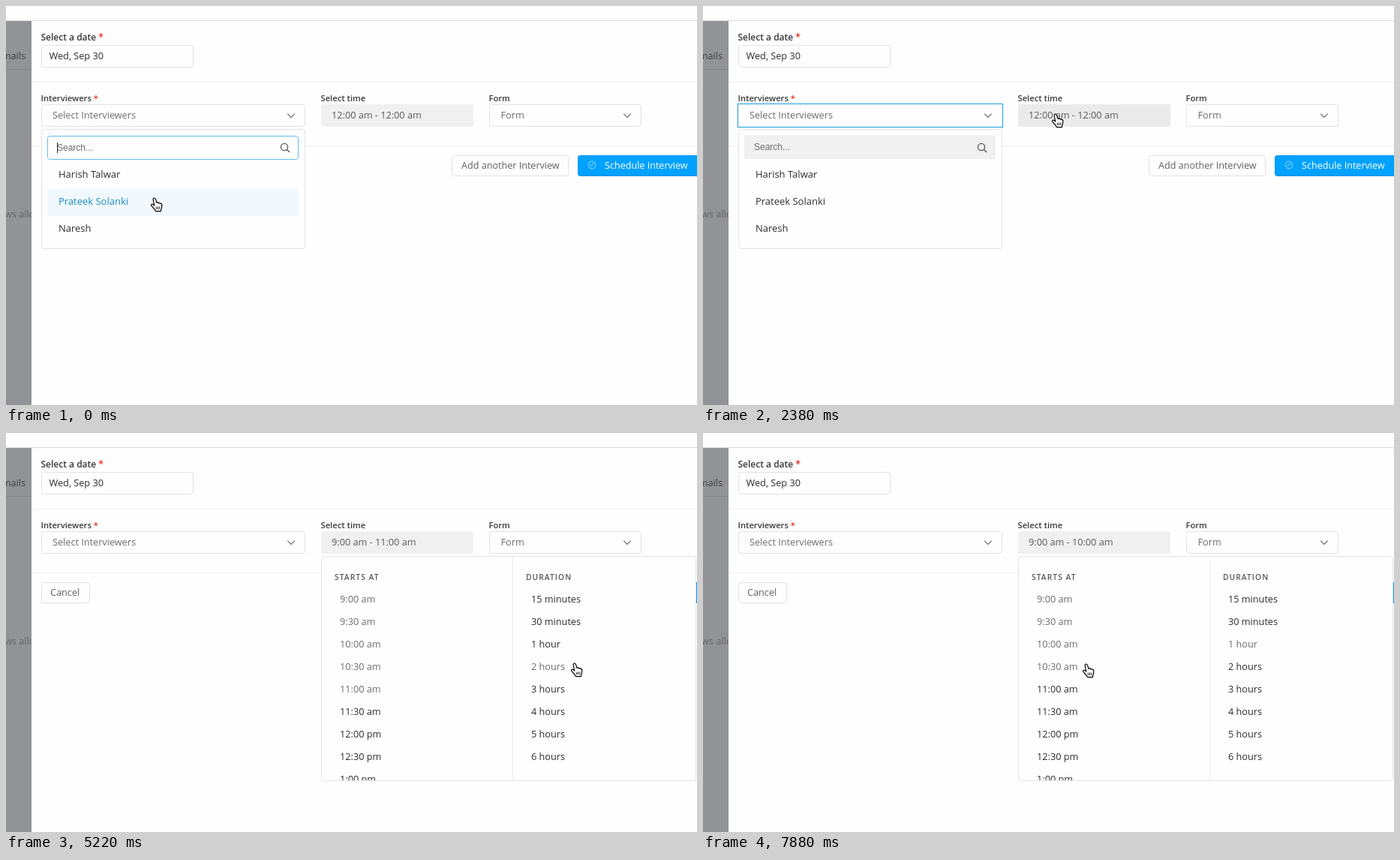
An HTML page that plays this animation: 921 by 532 pixels, repeating every 8000 ms.

```html
<!DOCTYPE html>
<html lang="en">
<head>
<meta charset="utf-8">
<title>Schedule interview</title>
<style>
html, body { margin: 0; width: 100%; height: 100%; overflow: hidden; background: #fefefe; }
svg { display: block; width: 100%; height: 100%; }
text { font-family: "Open Sans", "Noto Sans", sans-serif; white-space: pre; }
</style>
</head>
<body>
<svg id="stage" viewBox="0 0 921 532"></svg>
<script>
const LOOP = 8000, STEP = 148.75;
const INK = '#2b2d30', GREY = '#6c6c6c', LINE = '#e2e2e2', BLUE = '#1a9fe0';
const PEOPLE = ['Harish Talwar', 'Prateek Solanki', 'Naresh'];
const LENGTHS = ['15 minutes', '30 minutes', '1 hour', '2 hours', '3 hours', '4 hours', '5 hours', '6 hours'];

// Pointer stops: step, x, y of the fingertip
const PATH = [
  [0, 198, 256], [2, 185, 222], [3, 181, 214], [8, 181, 214], [9, 160, 154],
  [10, 160, 154], [11, 160, 147], [13, 160, 147], [14, 200, 147], [16, 470, 144],
  [17, 522, 142], [19, 522, 142], [20, 515, 190], [21, 505, 213], [23, 505, 213],
  [25, 715, 280], [26, 758, 300], [27, 758, 303], [29, 758, 303], [30, 758, 307],
  [35, 758, 307], [37, 755, 331], [41, 755, 331], [42, 755, 326], [45, 754, 288],
  [48, 754, 288], [53, 511, 308]
];

function pointerAt(n) {
  const i = PATH.findIndex(p => p[0] >= n);
  if (i < 1) return PATH.at(i).slice(1);
  const [a, ax, ay] = PATH[i - 1], [b, bx, by] = PATH[i];
  const k = (n - a) / (b - a);
  return [ax + (bx - ax) * k, ay + (by - ay) * k].map(Math.round);
}

const text = (x, y, s, fill = INK, size = 12.7, extra = '') =>
  `<text x="${x}" y="${y}" fill="${fill}" font-size="${size}" ${extra}>${s}</text>`;
const fillBox = (x, y, w, h, fill, r = 0) =>
  `<rect x="${x}" y="${y}" width="${w}" height="${h}" rx="${r}" fill="${fill}"/>`;
const box = (x, y, w, h, stroke = LINE, r = 3) =>
  `<rect x="${x + .5}" y="${y + .5}" width="${w - 1}" height="${h - 1}" rx="${r}" fill="#fefefe" stroke="${stroke}"/>`;
const stroke = (d, color, w = 1) => `<path d="${d}" fill="none" stroke="${color}" stroke-width="${w}"/>`;
const chevron = x => stroke(`M${x - 4.7} 143.7l4.7 4.7 4.7-4.7`, '#6a6a6a', 1.2);
const label = (x, y, s, size, star = '') =>
  text(x, y, `${s}<tspan fill="#e8291c">${star}</tspan>`, '#37393c', size, 'font-weight="600"');

function clock(min) {
  const h = Math.floor(min / 60);
  return `${(h + 11) % 12 + 1}:${min % 60 ? '30' : '00'} ${h < 12 ? 'am' : 'pm'}`;
}

function page() {
  return fillBox(0, 0, 921, 532, '#fefefe')
    + fillBox(0, 20, 34, 512, '#929396')
    + stroke('M0 84.5H34', '#86878a')
    + text(26, 71, 'Emails', '#3f4043', 12.7, 'text-anchor="end"')
    + text(-2, 282, 'ws allowed', '#646568')
    + fillBox(34, 20, 887, 512, '#fefefe')
    + stroke('M0 19.5H921', '#dcdcdc')
    + stroke('M34 101.5H921M34 186.5H921', '#eee')
    + label(46.5, 46, 'Select a date', 12, ' *')
    + box(47, 52, 203, 30) + text(57.5, 71, 'Wed, Sep 30')
    + label(46.5, 127, 'Interviewers', 11.2, ' *')
    + label(419.5, 127, 'Select time', 11.2)
    + label(643.5, 127, 'Form', 11.2)
    + box(644, 131, 203, 30) + text(659.5, 150, 'Form', GREY) + chevron(828)
    + box(47, 199, 65, 28) + text(59, 217, 'Cancel', '#606060')
    + box(594, 199, 156, 28) + text(607, 217, 'Add another Interview', '#606060', 12.6)
    + fillBox(762, 199, 170, 28, '#0a8be0', 4) + fillBox(762.5, 199.5, 170, 26.5, '#00a2ff', 3.5)
    + '<circle cx="781" cy="212" r="4.8" fill="none" stroke="#a6dcff"/>'
    + stroke('M783 209.5L781 212.5H778.5', '#a6dcff')
    + text(798, 217, 'Schedule Interview', '#fff', 12.6);
}

function peopleField(tagged, focused) {
  let s = focused ? box(46, 130, 354, 32, BLUE, 0) : box(47, 131, 352, 30);
  s += tagged
    ? fillBox(53, 134, 120, 24, '#d41ba3', 3)
      + text(63, 150, PEOPLE[0], '#fff', 11.6, 'font-weight="600"')
      + stroke('M155.5 142.5l7 7m0-7l-7 7', '#fff', 1.2)
    : text(62, 150, 'Select Interviewers', GREY);
  return s + chevron(380);
}

function peopleList(names, typing, y) {
  let s = box(47, 164, 352, 52 + 36 * names.length, '#e4e4e4');
  s += typing
    ? box(55, 173, 335, 32, '#62bdec') + stroke('M68.5 182V196', '#222')
    : fillBox(55, 172, 335, 32, '#f0f0f0', 3);
  s += text(68, typing ? 193 : 192, 'Search...', '#6c6c6c', 12,
      'style="font-family:\'Liberation Sans\',Arial,sans-serif"')
    + '<circle cx="371" cy="188" r="4.6" fill="none" stroke="#555" stroke-width="1.3"/>'
    + stroke('M374.5 191.5l3.5 3.5', '#555', 1.5);
  const over = Math.floor((y - 207) / 36);
  names.forEach((name, i) => {
    if (i === over) s += fillBox(55, 208 + 36 * i, 335, 36, '#f1f9fe');
    s += text(70, 229 + 36 * i, name, i === over ? '#1b8cc6' : INK, 13);
  });
  return s;
}

function timeMenu(started, hours, x, y) {
  const row = Math.floor((y - 211) / 30), left = x < 675;
  const head = (x, s) => text(x, 196, s, '#55575a', 10.2, 'font-weight="600" letter-spacing="1.1"');
  let s = box(420, 164, 500, 300, '#e4e4e4') + stroke('M675.5 165V463', '#ececec')
    + head(438, 'STARTS AT') + head(693, 'DURATION')
    + '<clipPath id="menu"><rect x="421" y="165" width="498" height="298"/></clipPath><g clip-path="url(#menu)">';
  for (let i = 0; i < 9; i++) {
    const dim = started && i <= hours * 2 || left && i === row;
    s += text(445, 226 + 30 * i, clock(540 + 30 * i), dim ? GREY : INK);
  }
  LENGTHS.forEach((name, i) => {
    const dim = hours && i === hours + 1 || !left && i === row;
    s += text(700, 226 + 30 * i, name, dim ? GREY : INK);
  });
  return s + '</g>';
}

const hand = (x, y) => `<g transform="translate(${x} ${y})" stroke="#000" stroke-width="1.2" stroke-linejoin="round">
  <path fill="#fff" d="M-2 1.5Q-1.5-.5.3.3Q1.5 1 2 3L3 6.3Q4.5 5.2 5.6 6.9Q7.4 5.9 8.2 7.7Q9.9 7.2 9.8 9.5Q9.8 13 8.6 15.5L8.4 17.7H1.5Q1 16-1.4 13.5L-4.2 10.3Q-4.8 8.4-3.4 8Q-2 8-.3 10Z"/>
  <path fill="none" stroke-width=".9" d="M2.2 11.5l.3 3.7M4.5 11.5v3.7M6.7 11.5v3.7"/></g>`;

function scene(n) {
  const [x, y] = pointerAt(n);
  const tagged = n >= 5 && n < 13, menu = n >= 17, started = n >= 22;
  const hours = n < 28 ? 0 : n < 38 ? 2 : n < 48 ? 3 : 1;
  const overTime = x > 420 && x < 623 && y > 131 && y < 161;
  const from = started ? 540 : 0;
  return page()
    + peopleField(tagged, n >= 5 && !menu)
    + fillBox(420, 131, 203, 30, overTime ? '#eaeaea' : '#f0f0f0', 3)
    + text(434, 150, `${clock(from)} - ${clock(from + 60 * hours)}`, '#5a5a5a')
    + (menu ? timeMenu(started, hours, x, y) : peopleList(PEOPLE.slice(tagged ? 1 : 0), n < 5, y))
    + hand(x, y);
}

const stage = document.getElementById('stage');
let shown = -1;
function draw(now) {
  const n = Math.floor((now % LOOP + 5) / STEP);
  if (n !== shown) stage.innerHTML = scene(shown = n);
  requestAnimationFrame(draw);
}
draw(0);
</script>
</body>
</html>
```
